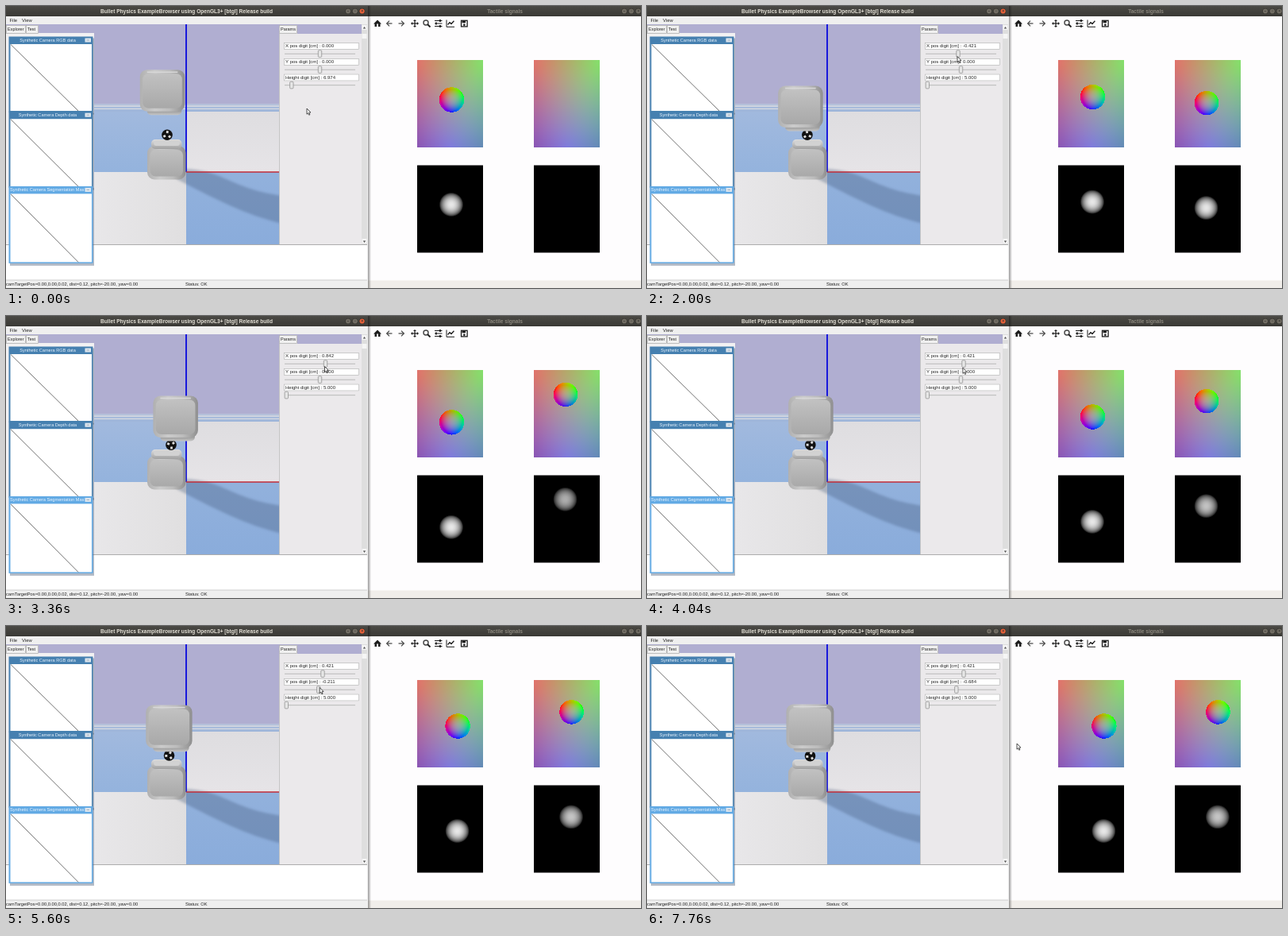
Write an HTML page with a canvas that moves like this. It is 800 px wide and 355 px high and loops after 7800 ms.

```html
<!DOCTYPE html>
<html lang="en">
<head>
<meta charset="utf-8">
<title>Tactile simulation</title>
<style>
  html, body { margin: 0; width: 100%; height: 100%; overflow: hidden; background: #fff; }
  canvas { display: block; }
</style>
</head>
<body>
<canvas id="stage" width="800" height="355"></canvas>
<script>
const c = document.getElementById('stage').getContext('2d');
const LOOP = 7800, STEP = 40;
const FONT = '"Liberation Sans", Arial, sans-serif';
const SKY = '#b0aed1';

// Slider drags: time, value
const xDrag = [[1750, 0], [2250, -.842], [3100, .842], [3500, .842], [3900, .421]];
const yDrag = [[4840, 0], [5150, -.632], [6600, .684], [7200, -.684]];
const hDrag = [[700, 6.974], [1200, 5]];

function at(track, t) {
  const i = track.findIndex(k => k[0] > t);
  if (i === 0) return track[0].slice(1);
  if (i < 0) return track[track.length - 1].slice(1);
  const a = track[i - 1], b = track[i], f = (t - a[0]) / (b[0] - a[0]);
  return a.slice(1).map((v, j) => v + (b[j + 1] - v) * f);
}

// The simulated body trails its slider
function trail(track, t) {
  let sum = 0;
  for (let i = 0; i < 10; i++) sum += at(track, t - 300 * i / 9)[0];
  return sum / 10;
}

const clamp = (v, a, b) => Math.min(b, Math.max(a, v));
const snap = (v, step) => Math.round(v / step) * step;
const posHandle = v => 395.5 + 8.3 * v;
const heightHandle = h => 353.3 + 3.3 * (h - 5);

function rect(x, y, w, h, fill) {
  c.fillStyle = fill;
  c.fillRect(x, y, w, h);
}

function frame(x, y, w, h, stroke) {
  c.strokeStyle = stroke;
  c.lineWidth = .7;
  c.strokeRect(x + .5, y + .5, w - 1, h - 1);
}

function text(s, x, y, size = 5.7, fill = '#222', style = '', align = 'left') {
  c.font = `${style} ${size}px ${FONT}`;
  c.textAlign = align;
  c.textBaseline = 'middle';
  c.fillStyle = fill;
  c.fillText(s, x, y);
}

function path(points) {
  c.beginPath();
  points.forEach(p => c.lineTo(...p));
}

function poly(points, fill) {
  path(points);
  c.fillStyle = fill;
  c.fill();
}

function line(points, stroke, width = 1) {
  path(points);
  c.strokeStyle = stroke;
  c.lineWidth = width;
  c.stroke();
}

function disc(x, y, r, fill) {
  c.beginPath();
  c.arc(x, y, r, 0, 7);
  c.fillStyle = fill;
  c.fill();
}

function round(x, y, w, h, r, fill) {
  c.beginPath();
  c.roundRect(x, y, w, h, r);
  c.fillStyle = fill;
  c.fill();
}

function ramp(x0, y0, x1, y1, ...colors) {
  const g = c.createLinearGradient(x0, y0, x1, y1);
  colors.forEach((k, i) => g.addColorStop(i / (colors.length - 1), k));
  return g;
}

function titleBar(x, w, label, mid, ink, firstButton, last) {
  rect(x, 0, w, 13, ramp(0, 0, 0, 13, '#4b4a45', '#3a3935'));
  text(label, mid, 7, 6.57, ink, 'bold', 'center');
  for (let i = 0; i < 3; i++) {
    const bx = firstButton + 8.8 * i;
    disc(bx, 6.5, 3.6, '#2f2e2a');
    disc(bx, 6.5, 3.1, i === 2 ? last : '#706c63');
    text('–▫×'[i], bx, 6.7, 5, '#35342f', 'bold', 'center');
  }
}

function cameraWindow(i, label) {
  const y = 38.5 + 94.2 * i, h = 96 + i, tint = i === 2 ? '#62aae4' : '#4680b0';
  rect(5, y + 2, 106, h, 'rgba(60,80,110,.4)');
  rect(3.5, y, 106, h - 1, tint);
  c.save();
  c.beginPath();
  c.rect(4, y, 95, 10);
  c.clip();
  if (i === 2) text(label, 5, y + 5, 5.65, '#e8f2fc');
  else text(label, 52.5, y + 5, 5.6, '#e8f2fc', '', 'center');
  c.restore();
  rect(99.5, y + 2, 7.5, 5, '#dfe7ef');
  line([[101.5, y + 4.5], [105, y + 4.5]], '#8795a5', .7);
  rect(5.5, y + 9.5, 102.5, h - 12, '#fff');
  line([[6, y + 10], [91, y + h - 2.5]], '#333', .7);
}

// A rounded grey sensor shell, lit from above
function shell(x, y, w, h) {
  round(x, y, w, h, 9, ramp(x, 0, x + w, 0, '#b0b0b0', '#cbcbcb', '#bcbcbc', '#8f8f8f'));
  round(x + 3.5, y + 5, w - 7, h - 9, 7, ramp(0, y, 0, y + h, '#c4c4c4', '#a6a6a6'));
  line([[x + 9, y + 3], [x + w - 9, y + 3]], '#d8d8d8', 1.5);
}

function floor() {
  rect(111, 123, 233, 10, '#9fb6da');
  rect(111, 123.3, 233, 1.2, '#c3c8da');
  rect(111, 125.3, 233, 1.5, '#dedee3');
  rect(111, 128.6, 233, 1.6, '#d3d6e0');
  rect(111, 133, 116, 76, ramp(0, 133, 0, 209, '#a1b9de', '#94b3dd'));
  rect(227, 133, 117, 76, ramp(0, 133, 0, 209, '#dedde0', '#e6e4e7'));
  rect(111, 209, 116, 91, ramp(111, 0, 227, 0, '#e8e7e9', '#e0dfe0'));
  rect(227, 209, 117, 91, ramp(0, 209, 0, 300, '#92b1dc', '#8aacdb'));

  c.save();
  c.filter = 'blur(1.5px)';
  c.beginPath();
  c.moveTo(215, 205);
  c.bezierCurveTo(275, 204, 275, 228, 348, 239);
  c.lineTo(348, 274);
  c.bezierCurveTo(300, 262, 270, 246, 215, 218);
  c.fillStyle = 'rgba(62,85,120,.32)';
  c.fill();
  c.restore();

  line([[227, 23], [227, 209]], '#0808dd', 1.8);
  line([[227, 209], [344, 209]], '#c22d38', 1.4);
}

function scene(x, y, h) {
  c.save();
  c.beginPath();
  c.rect(111, 23, 233, 277);
  c.clip();
  rect(111, 23, 233, 101, SKY);
  floor();

  shell(178, 176, 48.5, 42.5);
  round(183, 168, 38.5, 12, 5, ramp(0, 168, 0, 180, '#e0e0e0', '#a0a0a0'));
  round(186, 169, 33, 7, 4, '#d2d2d2');

  // Patched ball between the sensors
  c.save();
  c.translate(203 + 6 * x, 162.3 - 2 * y);
  disc(0, 0, 6.8, '#111');
  c.rotate(.6 + x);
  for (let i = 0; i < 3; i++) {
    c.rotate(Math.PI * 2 / 3);
    rect(2.2, -1.4 + y, 3, 2.8, '#ddd');
  }
  c.restore();

  const w = 56.5 - 5 * y, tall = 52.5 - 5 * y;
  const left = 197 + 20 * x - w / 2, top = 100.5 + 3 * y - (h - 5) * 10.3;
  round(left + 9, top + tall - 7, w - 13, 11.5, 5, ramp(0, top + tall - 3, 0, top + tall + 5, '#888', '#c9c9c9'));
  shell(left, top, w, tall);
  c.restore();
}

function slider(y, label, value, x) {
  rect(350, y, 95, 9, '#fff');
  frame(350, y, 95, 9, '#b4b4b4');
  text(`${label} [cm] : ${value.toFixed(3)}`, 352, y + 4.6, 6);
  rect(351, y + 13.7, 89, 1, '#b8b8b8');
  round(x - 2.2, y + 9.8, 4.4, 8.6, 1, '#e6e6e6');
  c.strokeStyle = '#888';
  c.lineWidth = .7;
  c.stroke();
}

function tab(x, w, label) {
  rect(x, 24, w, 11, '#f0f0f0');
  frame(x, 24, w, 11, '#aaa');
  text(label, x + 2, 29.6, 5.5);
}

function leftWindow(t, body) {
  const x = snap(at(xDrag, t)[0], 1 / 19);
  const y = snap(at(yDrag, t)[0], 1 / 19);
  const h = 5 + snap(at(hDrag, t)[0] - 5, 25 / 190);

  rect(0, 13, 456, 342, '#efefef');
  text('File', 4.5, 18, 5.9);
  text('View', 20, 18, 5.9);
  rect(0, 23, 448, 12, SKY);
  rect(0, 34, 111, 266, '#f2f1f2');
  tab(0, 25, 'Explorer');
  tab(25, 16, 'Test');
  scene(...body);

  rect(344, 35, 104, 265, '#ebe9eb');
  line([[344.5, 35], [344.5, 300]], '#bbb', .8);
  tab(344, 23, 'Params');
  slider(46, 'X pos digit', x, posHandle(x));
  slider(66, 'Y pos digit', y, posHandle(y));
  slider(85.5, 'Height digit', h, heightHandle(h));

  rect(448, 23, 7, 277, '#dedede');
  for (const sy of [24, 35, 293]) rect(448.5, sy, 6, 6, '#f5f5f5');
  poly([[449.8, 28.5], [453.2, 28.5], [451.5, 26]], '#555');
  poly([[449.8, 295.5], [453.2, 295.5], [451.5, 298]], '#555');

  rect(0, 300, 455, 45, '#fff');
  line([[0, 300.5], [455, 300.5]], '#999', .8);
  line([[0, 345], [455, 345]], '#bbb', .7);
  text('camTargetPos=0.00,0.00,0.02, dist=0.12, pitch=-20.00, yaw=0.00', 0, 350, 5.74);
  text('Status: OK', 226, 350);
  ['RGB data', 'Depth data', 'Segmentation Mask'].forEach((s, i) => cameraWindow(i, 'Synthetic Camera ' + s));
  titleBar(0, 456, 'Bullet Physics ExampleBrowser using OpenGL3+ [btgl] Release build',
    227.5, '#e4e0d6', 431, '#e8623a');
}

function toolbar() {
  const ink = '#1c1c1c', y = 22;
  poly([[463, 22.5], [468, 17.5], [473, 22.5]], ink);
  rect(464.5, 22, 2.5, 4, ink);
  rect(469, 22, 2.5, 4, ink);
  for (const [x, d] of [[483, 1], [498, -1]]) {
    line([[x, 18.7], [x - 3.3 * d, y], [x, 25.3]], '#444', 1.2);
    line([[x - 3.3 * d, y], [x + 3.5 * d, y]], '#444', 1.2);
  }
  for (let i = 0; i < 4; i++) {
    c.save();
    c.translate(515, y);
    c.rotate(i * Math.PI / 2);
    line([[0, 0], [4, 0]], ink, 1.2);
    poly([[5, 0], [2.9, -2], [2.9, 2]], ink);
    c.restore();
  }
  c.beginPath();
  c.arc(529, 21, 3, 0, 7);
  c.lineWidth = 1.4;
  c.stroke();
  line([[531, 23], [534.5, 26.5]], ink, 1.8);
  for (let i = 0; i < 3; i++) {
    const ly = 18.5 + 3.5 * i;
    line([[540, ly], [549.5, ly]], ink);
    rect(i === 1 ? 541 : 546, ly - 1.5, 1.8, 3, ink);
  }
  line([[555, 17.5], [555, 26.3], [565, 26.3]], ink);
  line([[556.5, 23.5], [559, 20.7], [561, 22.5], [564.4, 18.8]], ink, 1.3);
  c.strokeRect(573.5, 18.3, 7.6, 7.6);
  rect(574.5, 19, 4.5, 2.3, ink);
  disc(577.3, 23.8, 1.3, ink);
}

// Three coloured lights: red top left, green top right, blue below
function tactile(x0, cx, cy, r) {
  const w = 83, h = 110, img = c.createImageData(w, h);
  for (let j = 0; j < h; j++) for (let i = 0; i < w; i++) {
    const u = i / w, v = j / h;
    let red = 225 - 110 * Math.hypot(.85 * u, .8 * v);
    let green = 225 - 110 * Math.hypot(1 - u, .8 * v);
    let blue = Math.max(108, 220 - 115 * Math.hypot(.7 * (u - .5), 1 - v));
    const dx = (x0 + i - cx) / r, dy = (68.5 + j - cy) / r, rr = dx * dx + dy * dy;
    if (r > 1 && rr < 1) {
      const tilt = 70 + 80 * rr, shade = 55 * rr;
      red += tilt * (-.87 * dx - .5 * dy) - shade;
      green += tilt * (.87 * dx - .5 * dy) - shade;
      blue += tilt * dy - shade;
    }
    img.data.set([red, green, blue, 255], (j * w + i) * 4);
  }
  c.putImageData(img, x0, 68);
}

function depth(x0, cx, cy, r, level) {
  rect(x0, 200.5, 83, 110, '#000');
  if (r < 1) return;
  const g = c.createRadialGradient(cx, cy, 0, cx, cy, r);
  for (let i = 0; i <= 8; i++) {
    const s = level * Math.pow(1 - (i / 8) ** 2, .75);
    g.addColorStop(i / 8, `rgb(${s},${s},${s})`);
  }
  disc(cx, cy, r, g);
}

function rightWindow([x, y, h]) {
  rect(456, 13, 344, 342, '#fefdfe');
  rect(456, 345.5, 344, 9.5, '#f1eeea');
  titleBar(456, 344, 'Tactile signals', 628.5, '#8a867c', 779, '#706c63');
  rect(456, 0, 4, 355, ramp(456, 0, 460, 0, 'rgba(0,0,0,.4)', 'rgba(0,0,0,0)'));
  toolbar();
  const shift = -21 * y, low = 118 + 19 * x, high = 118 - 23 * x;
  const press = clamp((5.6 - h) / .6, 0, 1), r = 15.3 * Math.sqrt(press);
  tactile(518, 561 + shift, low, 15.7);
  tactile(665, 704.5 + shift, high, r);
  depth(518, 561 + shift, low + 132, 15.3, 232);
  depth(665, 704.5 + shift, high + 132, r, press * (220 - 55 * x));
}

// The pointer rests, holds each handle in turn, then leaves
function pointer(t) {
  const onHeight = [heightHandle(at(hDrag, t)[0]), 101];
  const onX = [posHandle(at(xDrag, t)[0]) - 1, 63.5];
  const onY = [posHandle(at(yDrag, t)[0]) + 1.5, 77.5];
  const [x, y] = at([
    [0, 379, 129], [600, ...onHeight], [1250, ...onHeight], [1700, ...onX],
    [3950, ...onX], [4700, ...onY], [7250, ...onY], [7600, 466, 148]], t);
  const arrow = [[0, 0], [0, 7.2], [1.6, 5.8], [2.8, 8.3], [3.9, 7.7], [2.8, 5.3], [4.9, 5], [0, 0]];
  c.save();
  c.translate(x, y);
  poly(arrow, '#fff');
  line(arrow, '#222', .8);
  c.restore();
}

function draw(now) {
  const t = Math.floor(now % LOOP / STEP) * STEP;
  const body = [xDrag, yDrag, hDrag].map(track => trail(track, t));
  leftWindow(t, body);
  rightWindow(body);
  pointer(t);
}

const start = performance.now();
function tick() {
  draw(performance.now() - start);
  requestAnimationFrame(tick);
}
tick();
</script>
</body>
</html>
```
